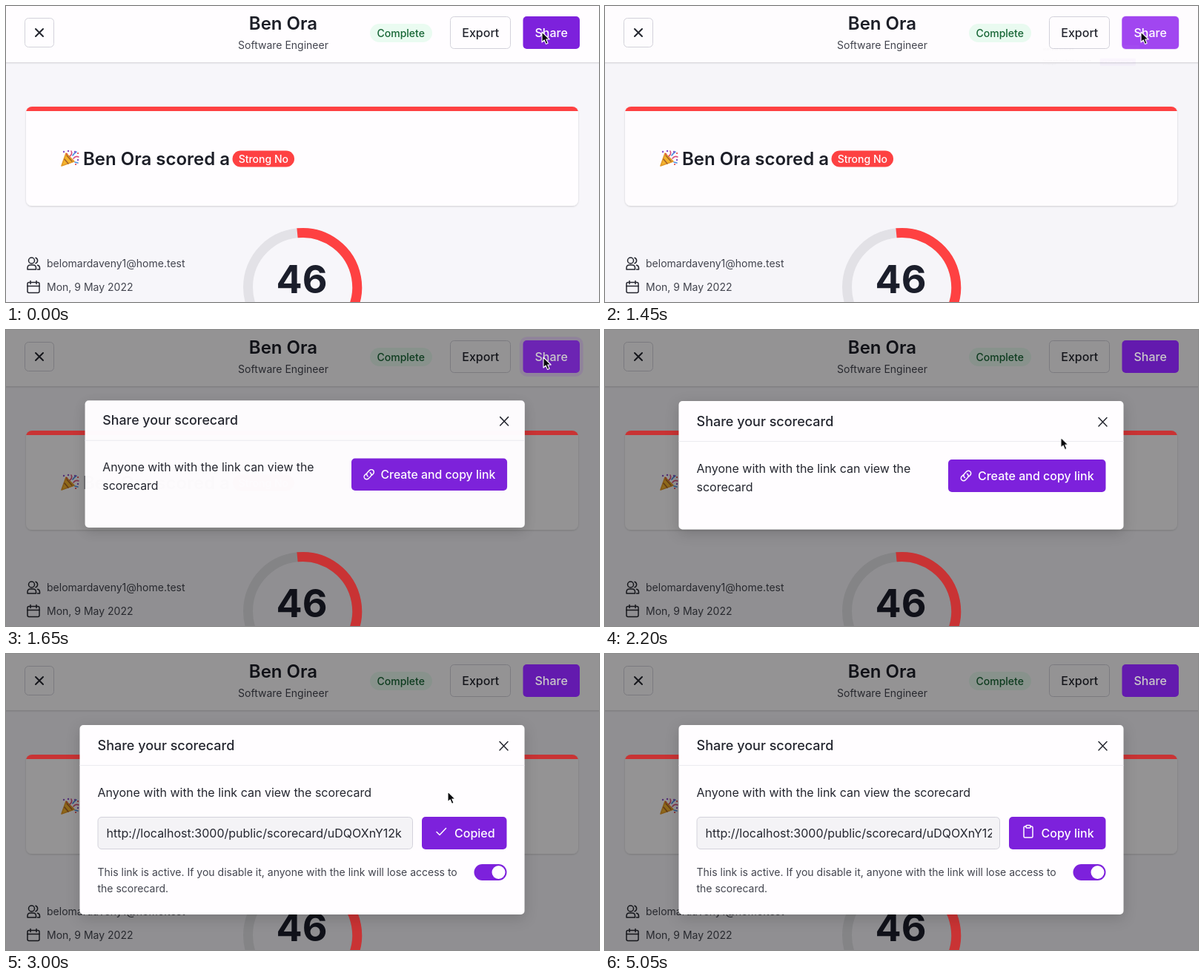
Write an HTML page that moves like this. It is 800 px wide and 400 px high and loops after 5.1 s.

```html
<!DOCTYPE html>
<html lang="en">
<head>
<meta charset="utf-8">
<title>Share scorecard</title>
<style>
  html, body { margin: 0; width: 100%; height: 100%; overflow: hidden; background: #f7f6fa; }
  svg { display: block; width: 800px; height: 400px; font: 14px Inter, sans-serif; }
  text { fill: #24262f; white-space: pre; }
  .name { font-size: 24px; font-weight: 600; fill: #1c1e27; }
  .title { font-size: 18px; font-weight: 500; }
  .body { font-size: 16px; }
  .btn { font-size: 16px; font-weight: 500; }
  .tag { font-weight: 500; }
  .soft { fill: #43454f; }
  .light { fill: #fffdff; }
  .mid { text-anchor: middle; }
  .box { fill: #fffdff; stroke: #d3d2db; }
  .purple { fill: #7d21dc; }
  .red { fill: #fe4142; }
  .icon { fill: none; stroke: #24262f; stroke-width: 1.5; stroke-linecap: round; stroke-linejoin: round; }
  .icon.light { fill: none; stroke: #fffdff; }

  .a { animation: 5100ms linear infinite; }
  .share { animation-name: share; }
  .mask { animation-name: mask; }
  .dim { animation-name: dim; }
  .wave { animation-name: wave; }
  .modal { animation-name: zoom; transform-origin: 728px 40px; }
  .create { animation-name: create; }
  .cursor { animation-name: move; }
  .step { animation-timing-function: step-end; }
  .before { animation-name: before; }
  .after { animation-name: after; }
  .copied { animation-name: copied; }
  .copy { animation-name: copy; }

  @keyframes share {
    0%, 7.843% { fill: #7d21dc; }
    13.725%, 28.431% { fill: #a146f0; }
    34.314%, 100% { fill: #7d21dc; }
  }
  @keyframes mask {
    0%, 28.431% { opacity: 0; }
    32.353%, 100% { opacity: .42; }
  }
  @keyframes dim {
    0%, 28.431% { filter: brightness(1); }
    32.353%, 100% { filter: brightness(.79); }
  }
  @keyframes wave {
    0%, 28.431% { opacity: 0; stroke-width: 0; }
    28.45% { opacity: .4; stroke-width: 1px; }
    30.392% { opacity: .25; stroke-width: 8px; }
    36.275%, 100% { opacity: 0; stroke-width: 12px; }
  }
  @keyframes zoom {
    0%, 28.431% { transform: scale(.2); opacity: 0; animation-timing-function: cubic-bezier(.08, .82, .17, 1); }
    34.314%, 100% { transform: none; opacity: 1; }
  }
  @keyframes create {
    0%, 46.08% { fill: #7d21dc; }
    51.96%, 100% { fill: #a146f0; }
  }
  @keyframes move {
    0%, 28.431% { transform: translate(723px, 35px); }
    30.392%, 33.333% { transform: translate(725px, 37px); animation-timing-function: ease-in-out; }
    43.137% { transform: translate(615px, 145px); animation-timing-function: ease-out; }
    49.02%, 62.745% { transform: translate(596px, 186px); opacity: 1; }
    62.746%, 100% { transform: translate(596px, 186px); opacity: 0; }
  }
  @keyframes before { 0% { visibility: visible; } 54.902%, 100% { visibility: hidden; } }
  @keyframes after { 0% { visibility: hidden; } 54.902%, 100% { visibility: visible; } }
  @keyframes copied { 0% { visibility: hidden; } 54.902% { visibility: visible; } 74.51%, 100% { visibility: hidden; } }
  @keyframes copy { 0% { visibility: hidden; } 74.51%, 100% { visibility: visible; } }
</style>
</head>
<body>
<svg viewBox="0 0 800 400">
  <defs>
    <filter id="low" x="-10%" y="-10%" width="120%" height="130%">
      <feDropShadow dx="0" dy="1" stdDeviation="1" flood-color="#000" flood-opacity=".16"/>
    </filter>
    <filter id="high" x="-10%" y="-20%" width="120%" height="150%">
      <feDropShadow dx="0" dy="5" stdDeviation="9" flood-color="#000" flood-opacity=".16"/>
    </filter>
    <clipPath id="card"><rect x="27" y="136" width="745" height="134" rx="8"/></clipPath>
    <clipPath id="wide"><rect x="136" y="222" width="402" height="40"/></clipPath>
    <clipPath id="slim"><rect x="136" y="222" width="386" height="40"/></clipPath>
  </defs>

  <!-- page -->
  <rect width="800" height="400" fill="#f7f6fa"/>
  <rect x="-10" y="-10" width="820" height="86" fill="#fffdff" filter="url(#low)"/>
  <rect class="box" x="25.5" y="16.5" width="39" height="39" rx="5"/>
  <path class="icon" d="M40 31l10 10m0-10l-10 10" style="stroke-width:2"/>
  <text class="name mid" x="374" y="32">Ben Ora</text>
  <text class="soft mid" x="374" y="57.5">Software Engineer</text>
  <rect x="491" y="24" width="84" height="25" rx="12.5" fill="#eafbf1"/>
  <text class="tag mid" x="532.7" y="41.8" style="fill:#166534">Complete</text>
  <rect class="box" x="599.5" y="14.5" width="81" height="43" rx="5"/>
  <text class="btn mid" x="640.3" y="41.5">Export</text>

  <rect x="27" y="136" width="745" height="134" rx="8" fill="#fffdff" filter="url(#low)"/>
  <g stroke-width="1.6" stroke-linecap="round" fill="none">
    <path d="M81 199l-6 17 17-6z" fill="#f5b52e" stroke="#e39a28" stroke-linejoin="round"/>
    <path d="M79 207l5 6m-2-11l7 8" stroke="#a8642a"/>
    <path d="M86 203q4-3 2-7M91 206q3-4 7-2" stroke="#d94f7c"/>
    <path d="M90 202q2-3 5-5M93 211l4 1" stroke="#4b8fe0"/>
    <path d="M78 197h.1M93 197h.1M97 208h.1M84 196h.1" stroke="#8d55c9" stroke-width="2.4"/>
    <path d="M97 199h.1M82 200h.1M94 214h.1" stroke="#e5484d" stroke-width="2.2"/>
  </g>
  <text class="name" x="104" y="215">Ben Ora scored a</text>
  <rect class="red" x="305.5" y="195.5" width="83.5" height="22" rx="11"/>
  <text class="tag light mid" x="347.3" y="212">Strong No</text>

  <g class="icon">
    <circle cx="34.5" cy="344" r="4"/>
    <path d="M29 356v-2q0-4 4-4h3.500q4 0 4 4v2zM40 340.300a4 4 0 0 1 0 7.500M42.500 350.300q3 .7 3 4v1.700h-3"/>
    <rect x="29" y="373.500" width="16" height="14" rx="2"/>
    <path d="M29 378.500h16M33 371.500v4m8-4v4"/>
  </g>
  <text class="soft" x="55" y="353">belomardaveny1@home.test</text>
  <text class="soft" x="55" y="385">Mon, 9 May 2022</text>
  <circle cx="400" cy="380" r="73.500" fill="none" stroke="#e3e2e7" stroke-width="13"/>
  <text class="mid" x="399" y="388" style="font-size:52px;font-weight:700;fill:#1b1e2b">46</text>

  <rect class="a mask" width="800" height="400"/>

  <!-- accents keep more of their colour under the mask -->
  <g class="a dim">
    <rect class="red" x="27" y="136" width="745" height="6" clip-path="url(#card)"/>
    <path d="M393 306.800A73.500 73.500 0 0 1 419 451" fill="none" stroke="#fe4142" stroke-width="13"/>
    <rect class="a wave" x="697.500" y="14" width="76.500" height="44" rx="5" fill="none" stroke="#a146f0"/>
    <rect class="a share" x="697.500" y="14" width="76.500" height="44" rx="5"/>
    <text class="btn light mid" x="735.700" y="41.500">Share</text>
  </g>

  <!-- dialog -->
  <g class="a modal">
    <rect class="a step before" x="99.500" y="96" width="600" height="173.500" rx="5" fill="#fffdff" filter="url(#high)"/>
    <rect class="a step after" x="99.500" y="96" width="600" height="256" rx="5" fill="#fffdff" filter="url(#high)"/>
    <text class="title" x="123.500" y="129.500">Share your scorecard</text>
    <path class="icon" d="M666 118.500l11 11.500m0-11.500l-11 11.500"/>
    <path d="M99.500 150.500h600" stroke="#ecebf0"/>

    <g class="a step before">
      <text class="body" x="123.500" y="193">Anyone with with the link can view the</text>
      <text class="body" x="123.500" y="218">scorecard</text>
      <rect class="a create" x="463" y="175" width="212.500" height="44" rx="5"/>
      <g class="icon light" transform="rotate(-45 487 197)">
        <path d="M485 193.500h-2.500a3.500 3.500 0 0 0 0 7h4a3.500 3.500 0 0 0 3.400-4.300M489 200.500h2.500a3.500 3.500 0 0 0 0-7h-4a3.500 3.500 0 0 0-3.400 4.300"/>
      </g>
      <text class="btn light" x="503" y="202.500">Create and copy link</text>
    </g>

    <g class="a step after">
      <text class="body" x="123.500" y="193">Anyone with with the link can view the scorecard</text>
      <text class="soft" x="123.500" y="300.300">This link is active. If you disable it, anyone with the link will lose access to</text>
      <text class="soft" x="123.500" y="322.300">the scorecard.</text>
      <rect class="purple" x="631.500" y="284" width="44" height="22" rx="11"/>
      <circle cx="664.500" cy="295" r="9" fill="#fffdff"/>
    </g>

    <g class="a step copied">
      <rect class="box" x="124" y="220.500" width="424.500" height="43" rx="5" style="fill:#f4f3f6"/>
      <text class="body" x="135.500" y="247.800" clip-path="url(#wide)">http://localhost:3000/public/scorecard/uDQOXnY12k</text>
      <rect class="purple" x="561" y="220" width="114.500" height="44" rx="5"/>
      <path class="icon light" d="M581 240.500l4 4 8.500-9"/>
      <text class="btn light" x="605" y="247.500">Copied</text>
    </g>

    <g class="a step copy">
      <rect class="box" x="124" y="220.500" width="408.500" height="43" rx="5" style="fill:#f4f3f6"/>
      <text class="body" x="135.500" y="247.800" clip-path="url(#slim)">http://localhost:3000/public/scorecard/uDQOXnY12k</text>
      <rect class="purple" x="545" y="220" width="130.500" height="44" rx="5"/>
      <g class="icon light">
        <path d="M568 233h-1.500q-1.500 0-1.500 1.500v12q0 1.500 1.500 1.500h9q1.500 0 1.500-1.500v-12q0-1.500-1.500-1.500h-1.500"/>
        <rect x="568" y="231.500" width="6" height="3.500" rx="1"/>
      </g>
      <text class="btn light" x="588.500" y="247.500">Copy link</text>
    </g>
  </g>

  <g class="a cursor">
    <path d="M0 0v14l3.200-3 2.300 5.400 2.600-1.100-2.300-5.300h4.400z" fill="#08080c" stroke="#fff" stroke-width="1.100" stroke-linejoin="round"/>
  </g>
</svg>
</body>
</html>
```
